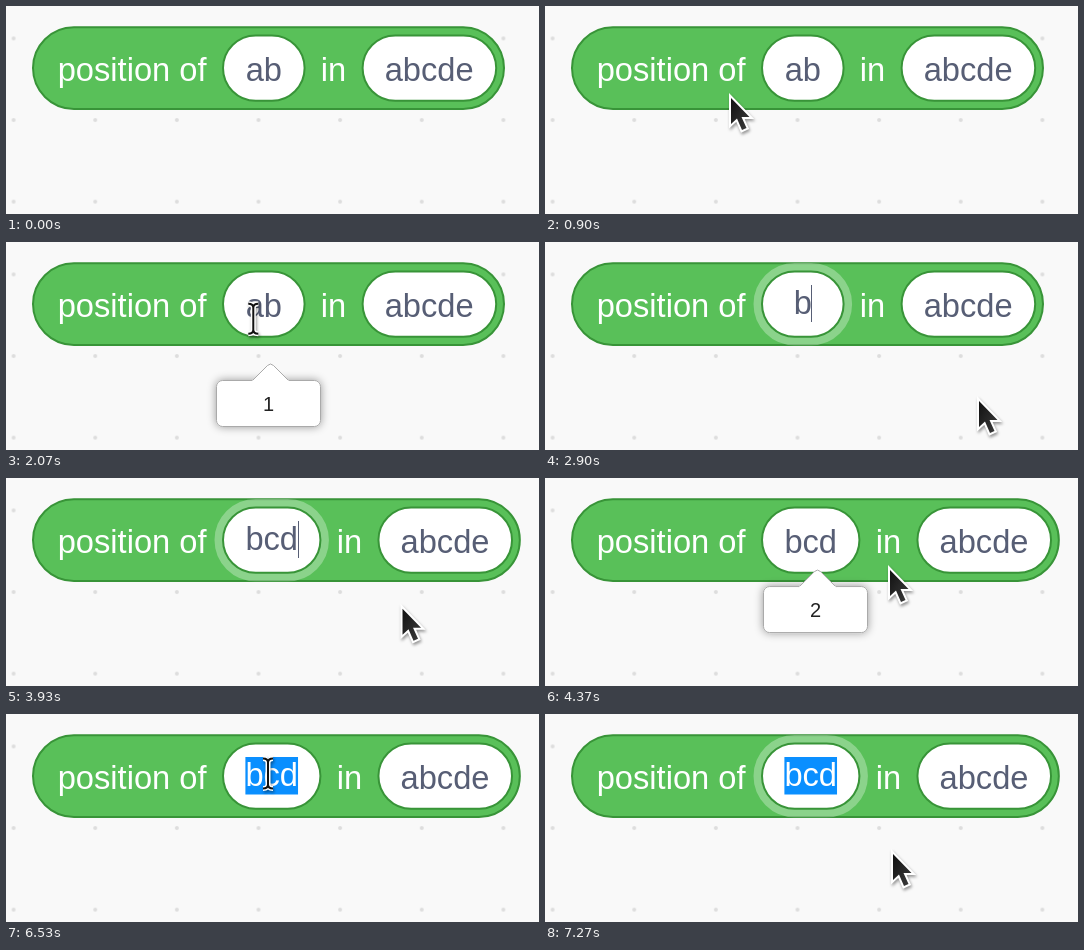
Write an HTML page that moves like this. It is 533 by 208 pixels and loops after 8 s.

```html
<!DOCTYPE html>
<html lang="en">
<head>
<meta charset="utf-8">
<title>Position block</title>
<style>
  html, body { margin: 0; width: 100%; height: 100%; overflow: hidden; background: #f9f9f9; }
  svg { display: block; font: 32.65px "Liberation Sans", Arial, sans-serif; }
  .line { stroke: #389438; stroke-width: 2; }
  .value { fill: #575e75; text-anchor: middle; }
  .bubble { fill: #fff; stroke: #aaa; }
  .report { fill: #222; font-size: 20px; text-anchor: middle; }
  .pointer { filter: drop-shadow(1px 2px 1.5px rgba(0, 0, 0, .4)); }
</style>
</head>
<body>
<svg width="533" height="208" viewBox="0 0 533 208">
  <defs>
    <pattern id="grid" x="-33.2" y="-8.4" width="81.63" height="81.63" patternUnits="userSpaceOnUse">
      <circle cx="40.8" cy="40.8" r="2" fill="#ddd"/>
    </pattern>
    <filter id="glow" filterUnits="userSpaceOnUse" x="-20" y="-20" width="580" height="180" color-interpolation-filters="sRGB">
      <feGaussianBlur in="SourceGraphic" stdDeviation="8.2"/>
      <feComponentTransfer result="halo">
        <feFuncA type="table" tableValues="0 1 1 1 1 1 1 1 1 1 1 1 1 1 1 1"/>
      </feComponentTransfer>
      <feFlood flood-color="#fff200"/>
      <feComposite in2="halo" operator="in" result="rim"/>
      <feMerge><feMergeNode in="rim"/><feMergeNode in="SourceGraphic"/></feMerge>
    </filter>
    <filter id="shade" x="-20%" y="-40%" width="140%" height="180%">
      <feDropShadow dx="0" dy="0" stdDeviation="4.5" flood-opacity=".4"/>
    </filter>
    <linearGradient id="ink" x2="1" y2="1">
      <stop stop-color="#111"/><stop offset="1" stop-color="#3c3c3c"/>
    </linearGradient>
  </defs>
  <rect width="533" height="208" fill="url(#grid)"/>
  <g id="scene"></g>
</svg>
<script>
const LOOP = 8000, EM = 32.65;
const FIELD_X = 217, FIELD_Y = 29.4, FIELD_H = 65.4;
const scene = document.getElementById('scene');

// Pointer keys: time, x, y
const PATH = [
  [300, 222, 22], [500, 179, 45], [700, 179, 45], [900, 184, 88], [1260, 184, 88],
  [1400, 221, 146], [1530, 221, 146], [1700, 262, 163], [1830, 286, 158], [2100, 246, 74],
  [2500, 246, 74], [2770, 432, 155], [3770, 432, 155], [4130, 343, 88], [4380, 343, 88],
  [4600, 344, 172], [4830, 344, 172], [5030, 268, 168], [5130, 286, 162], [5230, 293, 167],
  [5430, 293, 167], [6230, 262, 59.5], [6560, 262, 59.5], [6930, 450, 112], [7270, 346, 136]
];
const EDITS = [[2470, 4170], [6530, LOOP]];
const REPORTS = [
  { start: 1137, end: 2330, text: 1, x: 262.5 },
  { start: 4370, end: 6370, text: 2, x: 270.5 }
];

const between = (t, a, b) => t >= a && t < b;
const clamp = v => Math.min(1, Math.max(0, v));
const textWidth = s => [...s].reduce((w, c) => w + (c === 'c' ? .5 : .556), 0) * EM;

// cubic-bezier(.25, .1, .25, 1)
function ease(p) {
  p = clamp(p);
  let lo = 0, hi = 1;
  const curve = (u, a, b) => 3 * u * (1 - u) ** 2 * a + 3 * u * u * (1 - u) * b + u ** 3;
  for (let i = 0; i < 20; i++) {
    const mid = (lo + hi) / 2;
    if (curve(mid, .25, .25) < p) lo = mid; else hi = mid;
  }
  return curve(lo, .1, 1);
}

function pointerAt(t) {
  const i = PATH.findIndex(k => k[0] > t);
  if (i === 0) return null;
  if (i < 0) return PATH.at(-1).slice(1);
  const [t0, x0, y0] = PATH[i - 1], [t1, x1, y1] = PATH[i];
  const p = (t - t0) / (t1 - t0), s = p * p * (3 - 2 * p);
  return [x0 + (x1 - x0) * s, y0 + (y1 - y0) * s];
}

const valueAt = t => t < 2900 ? 'ab' : t < 3170 ? 'b' : t < 3570 ? 'bc' : 'bcd';

const pill = (x, y, w, h, attrs) =>
  `<rect x="${x}" y="${y}" width="${w}" height="${h}" rx="${h / 2}" ${attrs}/>`;
const text = (x, y, s, attrs) => `<text x="${x}" y="${y}" ${attrs}>${s}</text>`;
const field = (x, w) => pill(x, FIELD_Y, w, FIELD_H, 'class="line" fill="#fff"');

function editor(t, start, value, w) {
  const spread = 8.5 * ease((t - start) / 250);
  const mid = FIELD_X + w / 2, half = textWidth(value) / 2;
  const selected = start > 6000 || t < 2900;
  const ring = pill(FIELD_X - spread / 2, FIELD_Y - spread / 2, w + spread, FIELD_H + spread,
    `fill="none" stroke="#fff" stroke-opacity=".3" stroke-width="${spread}"`);
  const mark = selected
    ? `<rect x="${mid - half}" y="43" width="${half * 2}" height="37.5" fill="#0a8fff"/>`
    : `<rect x="${Math.floor(mid + half)}" y="43" width="1" height="37" fill="#575e75"/>`;
  return ring + field(FIELD_X, w) + mark +
    text(mid, 72, value, `class="value" ${selected ? 'style="fill:#fff"' : ''}`);
}

function block(t) {
  const value = valueAt(t), w = Math.max(81.6, textWidth(value) + 44.8), shift = w - 81.6;
  const edit = EDITS.find(([a, b]) => between(t, a, b));
  const glow = between(t, 1100, 1137) || between(t, 4330, 4370);
  return `<g ${glow ? 'filter="url(#glow)"' : ''}>` +
    pill(27, 21.2, 471 + shift, 81.8, 'class="line" fill="#59c059"') +
    text(51.7, 75, 'position of', 'fill="#fff"') +
    text(314.8 + shift, 75, 'in', 'fill="#fff"') +
    field(356.6 + shift, 133.6) +
    text(423.2 + shift, 75, 'abcde', 'class="value"') +
    (edit ? editor(t, edit[0], value, w)
      : field(FIELD_X, w) + text(FIELD_X + w / 2, 75, value, 'class="value"')) +
    '</g>';
}

function bubble(t) {
  const r = REPORTS.find(r => between(t, r.start, r.end));
  if (!r) return '';
  const y = 91.5 + 30 * ease((t - r.start) / 250);
  return `<g transform="translate(${r.x} ${y})">
    <rect class="bubble" x="-52" y="17" width="104" height="46" rx="6" filter="url(#shade)"/>
    <path class="bubble" d="M-16.5 17.5 L-1 2 Q2 -1 5 2 L20.5 17.5" stroke-linejoin="round"/>
    <path d="M-16 17.4H20" stroke="#fff" stroke-width="2"/>
    ${text(0, 47, r.text, 'class="report"')}</g>`;
}

function pointer(t) {
  const at = pointerAt(t);
  if (!at) return '';
  const [x, y] = at, grown = t < 3570 ? 0 : 16;
  const inField = y > FIELD_Y && y < FIELD_Y + FIELD_H &&
    (between(x, FIELD_X, 298.6 + grown) || between(x, 356.6 + grown, 490 + grown));
  const shape = inField
    ? '<path d="M-5 -15Q0 -15 0 -11V11Q0 15 -5 15M5 -15Q0 -15 0 -11V11Q0 15 5 15" fill="none" stroke="#fff" stroke-width="5"/>' +
      '<path d="M-5 -15Q0 -15 0 -11V11Q0 15 -5 15M5 -15Q0 -15 0 -11V11Q0 15 5 15" fill="none" stroke="#111" stroke-width="2"/>'
    : '<path d="M2 4V30L8 24.5L13 36L17.5 34L12.5 23H20.5Z" fill="url(#ink)" stroke="#fff" stroke-width="4" paint-order="stroke"/>';
  return `<g class="pointer" transform="translate(${x} ${y})">${shape}</g>`;
}

function draw(now) {
  const t = now % LOOP;
  scene.innerHTML = block(t) + bubble(t) + pointer(t);
  requestAnimationFrame(draw);
}
draw(performance.now());
</script>
</body>
</html>
```
